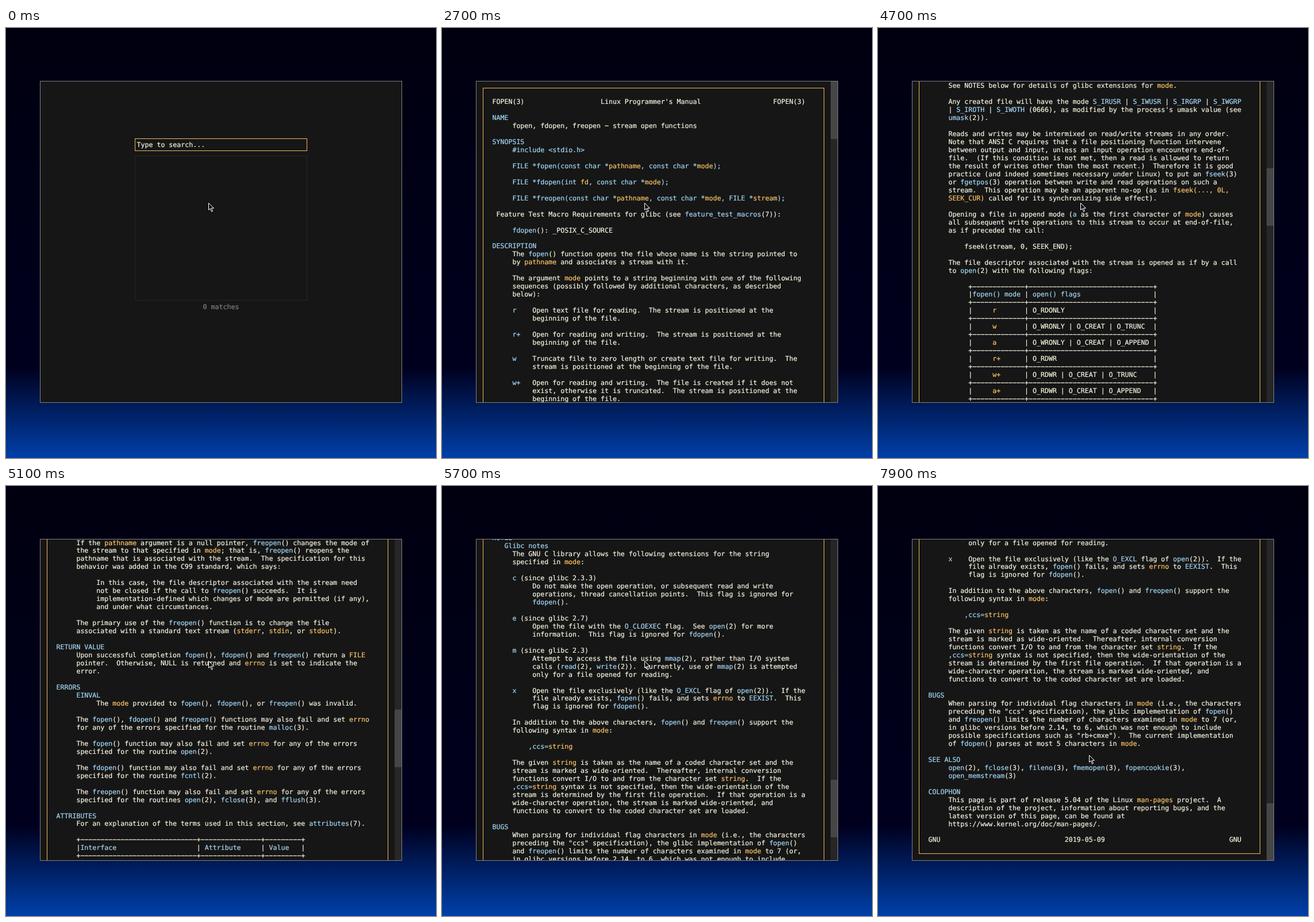
Write an HTML page that moves like this. It is 748x748 px and loops after 8 s.

```html
<!DOCTYPE html>
<html lang="en">
<head>
<meta charset="utf-8">
<title>Manual page search</title>
<style>
html, body { margin: 0; width: 100%; height: 100%; overflow: hidden; }
body {
  position: relative;
  background: linear-gradient(#000010, #00001e 79%, #0040aa);
  font: 11.6px/14px "DejaVu Sans Mono", monospace;
  text-rendering: geometricPrecision;
  -webkit-text-stroke: .2px;
  color: #f8f8e4;
}
div, svg { position: absolute; box-sizing: border-box; }
.line { white-space: pre; height: 14px; }
.blue { color: #a6daf8; }
.gold { color: #ffc666; }
#win { left: 59px; top: 92px; width: 630px; height: 560px; background: #161616; border: 1px solid #808080; overflow: hidden; }
#search, #page { left: -60px; top: -93px; width: 748px; }
#input { left: 224px; top: 192px; width: 300px; height: 22px; border: 1px solid #f4b760; }
#query { left: 227.5px; top: 196px; }
#list { left: 224px; top: 222px; width: 300px; height: 252px; border: 1px solid #262626; }
#pick { left: 224px; top: 226px; width: 300px; height: 14px; background: #2a2a2a; }
#rows { left: 227.5px; top: 226px; }
#count { left: 224px; top: 478px; width: 300px; text-align: center; color: #808080; }
#frame { left: 71px; top: 104px; width: 594px; height: 3094px; border: 1px solid #f4b760; }
#track { left: 616px; top: 0; width: 12px; height: 558px; background: #262626; }
#thumb { left: 0; top: 0; width: 12px; height: 100px; background: #464646; }
#cursor { left: 0; top: 0; overflow: visible; }
</style>
</head>
<body>
<div id="win">
  <div id="search">
    <div id="input"></div>
    <div id="query" class="line"></div>
    <div id="list"></div>
    <div id="pick"></div>
    <div id="rows"></div>
    <div id="count" class="line"></div>
  </div>
  <div id="page"><div id="frame"></div></div>
  <div id="track"><div id="thumb"></div></div>
</div>
<svg id="cursor" width="10" height="16">
  <path d="M.5 .5V12.5L3.3 10L5.6 15.5L7.5 14.6L5.3 9.4H9.4Z" fill="#111" stroke="#fff"/>
</svg>
<script>
const dash = n => '\u2212'.repeat(n);
const rule = `          +${dash(13)}+${dash(31)}+`;
const rule2 = `     +${dash(29)}+${dash(15)}+${dash(9)}+`;
const row = (mode, flags) => `          |     {${mode}}${' '.repeat(8 - mode.length)}| ${flags.padEnd(30)}|`;

// [..] is blue, {..} is gold
const manual = `FOPEN(3)                   Linux Programmer's Manual                  FOPEN(3)

[NAME]
     fopen, fdopen, freopen \u2212 stream open functions

[SYNOPSIS]
     [#include <stdio.h>]

     [FILE *fopen(const char *]{pathname}[, const char *]{mode}[);]

     [FILE *fdopen(int ]{fd}[, const char *]{mode}[);]

     [FILE *freopen(const char *]{pathname}[, const char *]{mode}[, FILE *]{stream}[);]

 Feature Test Macro Requirements for glibc (see [feature_test_macros](7)):

     [fdopen](): _POSIX_C_SOURCE

[DESCRIPTION]
     The [fopen]() function opens the file whose name is the string pointed to
     by {pathname} and associates a stream with it.

     The argument {mode} points to a string beginning with one of the following
     sequences (possibly followed by additional characters, as described
     below):

     [r]    Open text file for reading.  The stream is positioned at the
          beginning of the file.

     [r+]   Open for reading and writing.  The stream is positioned at the
          beginning of the file.

     [w]    Truncate file to zero length or create text file for writing.  The
          stream is positioned at the beginning of the file.

     [w+]   Open for reading and writing.  The file is created if it does not
          exist, otherwise it is truncated.  The stream is positioned at the
          beginning of the file.

     [a]    Open for appending (writing at end of file).  The file is created if
          it does not exist.  The stream is positioned at the end of the file.

     [a+]   Open for reading and appending (writing at end of file).  The file
          is created if it does not exist.  Output is always appended to the
          end of the file.  POSIX is silent on what the initial read position
          is when using this mode.  For glibc, the initial file position for
          reading is at the beginning of the file, but for some BSD systems,
          the initial file position for reading is at the end of the file.

     The {mode} string can also include the letter 'b' either as a last
     character or as a character between the characters in any of the
     two-character strings described above.  This is strictly for
     compatibility with C89 and has no effect; the 'b' is ignored on all POSIX
     conforming systems, including Linux.  (Other systems may treat text files
     and binary files differently, and adding the 'b' may be a good idea if
     you do I/O to a binary file and expect that your program may be ported to
     non-POSIX environments.)

     See NOTES below for details of glibc extensions for {mode}.

     Any created file will have the mode [S_IRUSR] | [S_IWUSR] | [S_IRGRP] | [S_IWGRP]
     | [S_IROTH] | [S_IWOTH] (0666), as modified by the process's umask value (see
     [umask](2)).

     Reads and writes may be intermixed on read/write streams in any order.
     Note that ANSI C requires that a file positioning function intervene
     between output and input, unless an input operation encounters end-of-
     file.  (If this condition is not met, then a read is allowed to return
     the result of writes other than the most recent.)  Therefore it is good
     practice (and indeed sometimes necessary under Linux) to put an [fseek](3)
     or [fgetpos](3) operation between write and read operations on such a
     stream.  This operation may be an apparent no-op (as in {fseek(..., 0L,}
     {SEEK_CUR)} called for its synchronizing side effect).

     Opening a file in append mode ([a] as the first character of {mode}) causes
     all subsequent write operations to this stream to occur at end-of-file,
     as if preceded the call:

         fseek(stream, 0, SEEK_END);

     The file descriptor associated with the stream is opened as if by a call
     to [open](2) with the following flags:

${rule}
          |[fopen() mode] | [open() flags]                  |
${rule}
${row('r', 'O_RDONLY')}
${rule}
${row('w', 'O_WRONLY | O_CREAT | O_TRUNC')}
${rule}
${row('a', 'O_WRONLY | O_CREAT | O_APPEND')}
${rule}
${row('r+', 'O_RDWR')}
${rule}
${row('w+', 'O_RDWR | O_CREAT | O_TRUNC')}
${rule}
${row('a+', 'O_RDWR | O_CREAT | O_APPEND')}
${rule}

   [fdopen()]
     The [fdopen]() function associates a stream with the existing file
     descriptor, {fd}.  The {mode} of the stream (one of the values "r", "r+",
     "w", "w+", "a", "a+") must be compatible with the mode of the file
     descriptor.  The file position indicator of the new stream is set to that
     belonging to {fd}, and the error and end-of-file indicators are cleared.
     Modes "w" or "w+" do not cause truncation of the file.  The file
     descriptor is not dup'ed, and will be closed when the stream created by
     [fdopen]() is closed.  The result of applying [fdopen]() to a shared memory
     object is undefined.

   [freopen()]
     The [freopen]() function opens the file whose name is the string pointed to
     by {pathname} and associates the stream pointed to by {stream} with it.  The
     original stream (if it exists) is closed.  The {mode} argument is used just
     as in the [fopen]() function.

     If the {pathname} argument is a null pointer, [freopen]() changes the mode of
     the stream to that specified in {mode}; that is, [freopen]() reopens the
     pathname that is associated with the stream.  The specification for this
     behavior was added in the C99 standard, which says:

          In this case, the file descriptor associated with the stream need
          not be closed if the call to [freopen]() succeeds.  It is
          implementation-defined which changes of mode are permitted (if any),
          and under what circumstances.

     The primary use of the [freopen]() function is to change the file
     associated with a standard text stream ({stderr}, {stdin}, or {stdout}).

[RETURN VALUE]
     Upon successful completion [fopen](), [fdopen]() and [freopen]() return a {FILE}
     pointer.  Otherwise, NULL is returned and {errno} is set to indicate the
     error.

[ERRORS]
     [EINVAL]
          The {mode} provided to [fopen](), [fdopen](), or [freopen]() was invalid.

     The [fopen](), [fdopen]() and [freopen]() functions may also fail and set {errno}
     for any of the errors specified for the routine [malloc](3).

     The [fopen]() function may also fail and set {errno} for any of the errors
     specified for the routine [open](2).

     The [fdopen]() function may also fail and set {errno} for any of the errors
     specified for the routine [fcntl](2).

     The [freopen]() function may also fail and set {errno} for any of the errors
     specified for the routines [open](2), [fclose](3), and [fflush](3).

[ATTRIBUTES]
     For an explanation of the terms used in this section, see [attributes](7).

${rule2}
     |[Interface]                    | [Attribute]     | [Value]   |
${rule2}
     |[fopen](), [fdopen](), [freopen]() | Thread safety | MT-Safe |
${rule2}

[CONFORMING TO]
     [fopen](), [freopen](): POSIX.1-2001, POSIX.1-2008, C89, C99.

     [fdopen](): POSIX.1-2001, POSIX.1-2008.

[NOTES]
   [Glibc notes]
     The GNU C library allows the following extensions for the string
     specified in {mode}:

     [c] (since glibc 2.3.3)
          Do not make the open operation, or subsequent read and write
          operations, thread cancellation points.  This flag is ignored for
          [fdopen]().

     [e] (since glibc 2.7)
          Open the file with the [O_CLOEXEC] flag.  See [open](2) for more
          information.  This flag is ignored for [fdopen]().

     [m] (since glibc 2.3)
          Attempt to access the file using [mmap](2), rather than I/O system
          calls ([read](2), [write](2)).  Currently, use of [mmap](2) is attempted
          only for a file opened for reading.

     [x]    Open the file exclusively (like the [O_EXCL] flag of [open](2)).  If the
          file already exists, [fopen]() fails, and sets {errno} to [EEXIST].  This
          flag is ignored for [fdopen]().

     In addition to the above characters, [fopen]() and [freopen]() support the
     following syntax in {mode}:

         [,ccs=]{string}

     The given {string} is taken as the name of a coded character set and the
     stream is marked as wide-oriented.  Thereafter, internal conversion
     functions convert I/O to and from the character set {string}.  If the
     [,ccs=]{string} syntax is not specified, then the wide-orientation of the
     stream is determined by the first file operation.  If that operation is a
     wide-character operation, the stream is marked wide-oriented, and
     functions to convert to the coded character set are loaded.

[BUGS]
     When parsing for individual flag characters in {mode} (i.e., the characters
     preceding the "ccs" specification), the glibc implementation of [fopen]()
     and [freopen]() limits the number of characters examined in {mode} to 7 (or,
     in glibc versions before 2.14, to 6, which was not enough to include
     possible specifications such as "rb+cmxe").  The current implementation
     of [fdopen]() parses at most 5 characters in {mode}.

[SEE ALSO]
     [open](2), [fclose](3), [fileno](3), [fmemopen](3), [fopencookie](3),
     [open_memstream](3)

[COLOPHON]
     This page is part of release 5.04 of the Linux {man-pages} project.  A
     description of the project, information about reporting bugs, and the
     latest version of this page, can be found at
     https://www.kernel.org/doc/man-pages/.

GNU                               2019-05-09                               GNU`;

const names = `fabs(3) faccessat(2) fallocate(1) fanotify_init(2) fchmod(2) fclose(3)
  fcntl(2) fdisk(8) feature_test_macros(7) fflush(3) fgetpos(3) fileno(3) find(1)
  flock(2) fmemopen(3) fnmatch(3) fold(1) fopen(3) fopen(3p) fopencookie(3) fork(2)
  form(3x) form_field_validation(3x) form_page(3x) format(3) fortune(6) info(1)
  ossl_provider_get0_infoptr_for_dispatch(3ssl)`.split(/\s+/);

// [start ms, value...]
const typing = [[0, '', 0], [1100, 'f', 1483], [1600, 'fo', 212], [1800, 'fop', 4],
  [1900, 'fope', 3], [2100, 'fopen', 3]];
const scroll = [[0, 0], [4400, 80], [4500, 310], [4600, 575], [4700, 838], [4800, 1080],
  [4900, 1300], [5000, 1492], [5100, 1650], [5300, 1715], [5400, 1860], [5500, 2025],
  [5600, 2185], [5700, 2329], [5800, 2460], [5900, 2558]];
const pointer = [[0, 352, 304], [6800, 352, 305], [7100, 352, 308], [7200, 352, 317],
  [7500, 359, 364], [7700, 364, 445], [7900, 367, 468]];
const LOOP = 8000, OPEN = 2700, MAX = 2558, PITCH = 13.97;

const $ = id => document.getElementById(id);
const at = (steps, t) => steps.filter(s => s[0] <= t).pop();
const move = (el, x, y) => { el.style.transform = `translate(${x}px, ${y}px)`; };

function addLine(parent, text, x, y) {
  const el = document.createElement('div');
  el.className = 'line';
  el.style.left = x + 'px';
  el.style.top = y + 'px';
  for (const part of text.split(/([\[{].*?[\]}])/)) {
    const mark = { '[': 'blue', '{': 'gold' }[part[0]];
    const span = document.createElement('span');
    if (mark) span.className = mark;
    span.textContent = mark ? part.slice(1, -1) : part;
    el.append(span);
  }
  parent.append(el);
}

manual.split('\n').forEach((text, i) => addLine($('page'), text, 87.5, Math.round(121 + i * PITCH)));

let shown = null;
function showSearch([, query, count]) {
  if (query === shown) return;
  shown = query;
  $('query').textContent = query || 'Type to search...';
  $('count').textContent = count + ' matches';
  $('pick').style.display = query ? '' : 'none';
  $('rows').textContent = '';
  if (query) {
    names.filter(n => n.includes(query)).slice(0, 17)
      .forEach((n, i) => addLine($('rows'), n, 0, i * 14));
  }
}

function render() {
  const t = performance.now() % LOOP;
  const reading = t >= OPEN;
  showSearch(at(typing, t));
  $('search').style.display = reading ? 'none' : '';
  $('page').style.display = $('track').style.display = reading ? '' : 'none';
  const y = at(scroll, t)[1];
  move($('page'), 0, -y);
  move($('thumb'), 0, Math.ceil(y / MAX * 458.5));
  const [, px, py] = at(pointer, t);
  move($('cursor'), px, py);
  requestAnimationFrame(render);
}
render();
</script>
</body>
</html>
```
